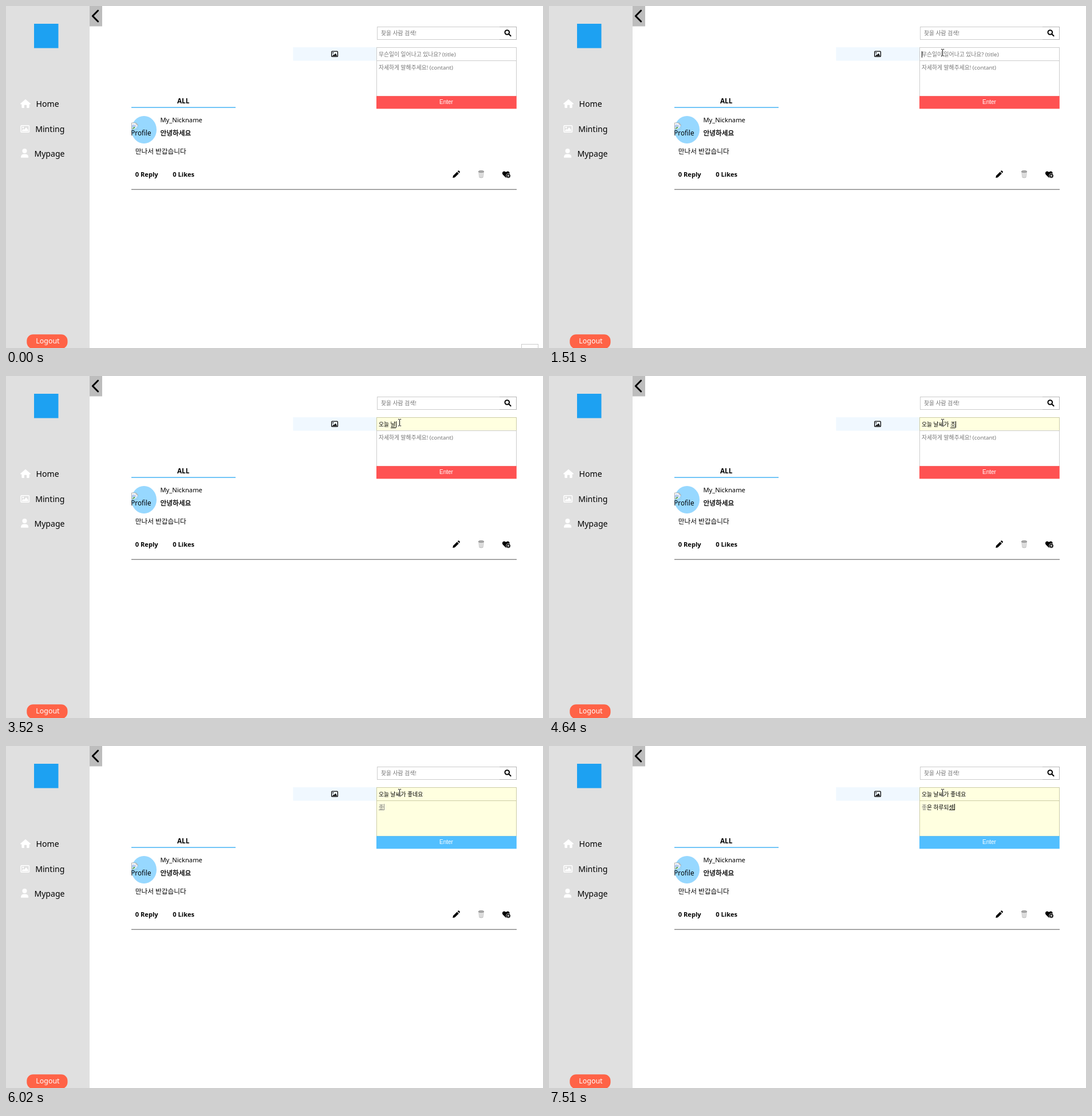
Write an HTML page that moves like this. It is 938x597 px and loops after 8 s.

```html
<!DOCTYPE html>
<html lang="ko">
<head>
<meta charset="utf-8">
<title>Post form</title>
<style>
  html, body { margin: 0; width: 100%; height: 100%; overflow: hidden; background: #fff; }
  svg { display: block; width: 938px; height: 597px; }
  text { font: 11.7px "Noto Sans", "Noto Sans CJK KR", "Noto Sans CJK JP", sans-serif; white-space: pre; }
  .nav { font-size: 14.1px; }
  .logout { font-size: 12.4px; fill: #fff; }
  .latin { font-size: 11.2px; }
  .bold { font-size: 11.1px; font-weight: 600; }
  .medium { stroke: #000; stroke-width: .35px; }
  .all { font-size: 11.8px; font-weight: 700; }
  .enter { font: 10px "Liberation Sans", sans-serif; fill: #fff; }
  .field { font-size: 9.8px; }
  .hint { fill: #757575; }
  .box { fill: #fff; stroke: #ccc; }
  .typed { fill: #ffffe0; stroke: #cccca6; }
  .crisp { shape-rendering: crispEdges; }
</style>
</head>
<body>
<svg viewBox="0 0 938 597">
  <!-- sidebar -->
  <rect width="146" height="597" fill="#e0e0e0"/>
  <rect x="146" width="22" height="35.5" fill="#bdbdbd"/>
  <path d="M160.7 8L151.3 17.5L160.7 27" fill="none" stroke="#000" stroke-width="3" stroke-linecap="round" stroke-linejoin="round"/>
  <rect x="49" y="31" width="42.5" height="42.5" fill="#1da1f2"/>
  <g fill="#fff">
    <path d="M34 162.8L43 170.6Q43 171.6 42 171.6H40.6V177Q40.6 178 39.6 178H36.2V173.6Q36.2 172.7 35.3 172.7H32.7Q31.8 172.7 31.8 173.6V178H28.4Q27.4 178 27.4 177V171.6H26Q25 171.6 25 170.6Z"/>
    <path fill-rule="evenodd" d="M27 208H39.5Q41.2 208 41.2 209.7V219.3Q41.2 221 39.5 221H27Q25.3 221 25.3 219.3V209.7Q25.3 208 27 208ZM26.9 209.6V219.4H39.6V209.6Z"/>
    <circle cx="29.8" cy="212" r="1.5"/>
    <path d="M27.8 218.6V217L30.3 214.6L31.8 216L35.2 211.8L38.8 216.4V218.6Z"/>
    <circle cx="32.5" cy="253" r="4"/>
    <path d="M26 264.8Q26 258.5 31 258.5H34Q39.2 258.5 39.2 264.8Z"/>
  </g>
  <text class="nav" x="52.6" y="176.1">Home</text>
  <text class="nav" x="51.2" y="219.8">Minting</text>
  <text class="nav" x="49.4" y="262.7">Mypage</text>
  <rect x="36.3" y="573.3" width="71.2" height="25" rx="11" fill="#ff6347"/>
  <text class="logout" x="52.3" y="589.2">Logout</text>

  <!-- search -->
  <rect class="box crisp" x="648.5" y="36.5" width="243" height="22"/>
  <path class="crisp" d="M862 36.5H891.5V58.5H862" fill="none" stroke="#b5b5b5"/>
  <text class="field hint" x="655" y="50.7">찾을 사람 검색!</text>
  <g fill="none" stroke="#000" stroke-width="2">
    <circle cx="875.3" cy="46" r="3.8"/>
    <path d="M878.1 48.8L881.6 52.3" stroke-linecap="round"/>
  </g>

  <!-- post form -->
  <rect x="501.5" y="72" width="146" height="23.5" fill="#f0f8ff"/>
  <rect x="568.7" y="79.2" width="10.7" height="9.2" rx="1.2" fill="none" stroke="#000" stroke-width="1.3"/>
  <circle cx="571.4" cy="81.8" r="1"/>
  <path d="M570 87.2L572.3 84.4L573.4 85.5L575.6 82.4L578.4 87.2Z"/>
  <rect id="titleBox" class="box crisp" x="647.5" y="72.5" width="244" height="23"/>
  <rect id="bodyBox" class="box crisp" x="647.5" y="95.5" width="244" height="62"/>
  <rect id="button" x="647" y="157.2" width="244.8" height="22.2"/>
  <text class="enter" x="769" y="171.3" text-anchor="middle">Enter</text>
  <text id="titleHint" class="field hint" x="651" y="87.6">무슨일이 일어나고 있나요? (title)</text>
  <text id="bodyHint" class="field hint" x="651" y="110.6">자세하게 말해주세요! (contant)</text>
  <text id="titleText" class="field" x="651" y="87.6"></text>
  <text id="bodyText" class="field" x="651" y="110.6"></text>
  <rect id="underline" class="crisp" height="1"/>
  <rect id="caret" class="crisp" width="1" height="11"/>

  <!-- feed -->
  <text class="all" x="309.7" y="170" text-anchor="middle">ALL</text>
  <rect x="219" y="176.3" width="182" height="1.6" fill="#52b8f6"/>
  <ellipse cx="241" cy="216" rx="22" ry="24" fill="#97d8ff"/>
  <path d="M219.5 204H227L230 207V215H219.5Z" fill="#fff" stroke="#999" stroke-width=".8"/>
  <path d="M220 208Q223 205 226 208L229 210L220 213Z" fill="#b5cdf2"/>
  <path d="M220 215L224 210.5L226 212.5L220.8 215Z" fill="#53a653"/>
  <path d="M224 215.5L230.5 209V215.5Z" fill="#97d8ff"/>
  <path d="M227 204V207H230" fill="none" stroke="#999" stroke-width=".8"/>
  <text x="218.3" y="226.2">Profile</text>
  <text class="latin" x="269.4" y="202.5">My_Nickname</text>
  <text class="medium" x="269.5" y="226.3">안녕하세요</text>
  <text x="225.7" y="257.9">만나서 반갑습니다</text>
  <text class="bold" x="225.8" y="298">0 Reply</text>
  <text class="bold" x="291.3" y="298">0 Likes</text>
  <path d="M780.3 300L781 296.3L787.9 289.4L790.9 292.4L784 299.3ZM788.7 288.6L789.8 287.6Q790.6 287 791.4 287.6L792.7 288.9Q793.3 289.7 792.7 290.5L791.7 291.6Z"/>
  <g fill="#f0f0f0" stroke="#999" stroke-width=".6">
    <path d="M825.8 289.5L827 299.2Q830 300.6 833 299.2L834.3 289.5Z"/>
    <path d="M828.2 291L828.7 299M830 291V299.3M831.8 291L831.3 299" stroke="#bbb" fill="none"/>
    <ellipse cx="830" cy="289" rx="4.8" ry="1.7" fill="#aaa" stroke="#777"/>
  </g>
  <path d="M873.3 299.8L867.9 294.4Q865.9 291.8 867.8 289.5Q870.6 287.2 873.3 290Q876 287.2 878.8 289.5Q880.7 291.8 878.7 294.4Z"/>
  <circle cx="877.4" cy="296.4" r="3.9" stroke="#fff" stroke-width=".7"/>
  <path d="M875.3 296.4H879.5M877.4 294.3V298.5" stroke="#fff"/>
  <rect x="219" y="319.7" width="673" height="1" fill="#555"/>

  <rect id="popup" class="box crisp" x="900.5" y="590.5" width="29" height="20"/>
  <g id="pointer" fill="none">
    <path d="M685 75.5H686.7L687.6 76.3L688.5 75.5H690.2M687.6 76.3V86.2M685 87H686.7L687.6 86.2L688.5 87H690.2" stroke="#fff" stroke-width="2.2" opacity=".6"/>
    <path d="M685 75.5H686.7L687.6 76.3L688.5 75.5H690.2M687.6 76.3V86.2M685 87H686.7L687.6 86.2L688.5 87H690.2" stroke="#000"/>
  </g>
</svg>
<script>
  const LOOP = 8000;
  const $ = id => document.getElementById(id);

  // [time, committed text, syllable being composed]
  const titleKeys = [
    [0, '', ''],
    [1760, '', 'ㅇ'], [1890, '', '오'],
    [2380, '', '온'], [2510, '오', '느'], [2640, '오', '늘'], [2770, '오늘 ', ''],
    [3140, '오늘 ', 'ㄴ'], [3270, '오늘 ', '나'], [3520, '오늘 ', '날'],
    [3770, '오늘 날', 'ㅆ'], [3890, '오늘 날', '씨'], [4020, '오늘 날씨', 'ㄱ'],
    [4140, '오늘 날씨', '가'], [4260, '오늘 날씨가 ', 'ㅈ'],
    [4640, '오늘 날씨가 ', '조'], [4760, '오늘 날씨가 ', '좋'], [4890, '오늘 날씨가 좋', 'ㄴ'],
    [5020, '오늘 날씨가 좋', '네'], [5140, '오늘 날씨가 좋네', '요'],
    [5400, '오늘 날씨가 좋네요', '']
  ];
  const bodyKeys = [
    [0, '', ''],
    [5900, '', 'ㅈ'], [6020, '', '좋'], [6270, '좋', 'ㅇ'], [6390, '좋', '으'],
    [6520, '좋', '은'], [6640, '좋은 ', ''],
    [6770, '좋은 ', '하'], [6890, '좋은 ', '할'], [7020, '좋은 하', '루'],
    [7140, '좋은 하루', '도'], [7260, '좋은 하루', '되'], [7390, '좋은 하루되', '세'],
    [7510, '좋은 하루되', '셍']
  ];

  const keyAt = (keys, t) => keys.findLast(k => k[0] <= t);
  const within = (t, a, b) => t >= a && t < b;
  const show = (el, on) => el.setAttribute('visibility', on ? 'visible' : 'hidden');
  const place = (el, attrs) => { for (const k in attrs) el.setAttribute(k, attrs[k]); };

  function fillField(name, text) {
    const el = $(name + 'Text');
    if (el.textContent !== text) el.textContent = text;
    show($(name + 'Hint'), !text);
    $(name + 'Box').setAttribute('class', (text ? 'typed' : 'box') + ' crisp');
    return el;
  }

  function draw(t) {
    const inBody = t >= 5400;
    const title = keyAt(titleKeys, t), body = keyAt(bodyKeys, t);
    // Ink is still fading in just after the first key in each field.
    const ink = within(t, 1760, 2010) || within(t, 5900, 6150) ? '#888' : '#000';

    const titleEl = fillField('title', title[1] + title[2]);
    titleEl.setAttribute('fill', inBody ? '#000' : ink);

    const text = body[1] + body[2];
    const bodyEl = fillField('body', text);
    if (text && !bodyEl.querySelector('tspan')) {
      bodyEl.innerHTML = `<tspan fill="#777">${text[0]}</tspan>${text.slice(1)}`;
    }
    $('button').setAttribute('fill', text ? '#52bfff' : '#ff5252');

    const el = inBody ? bodyEl : titleEl;
    const [, done, live] = inBody ? body : title;
    const end = done || live ? el.getComputedTextLength() : 0;
    const start = done && live ? el.getSubStringLength(0, done.length) : 0;
    const top = inBody ? (text ? 101 : 99) : 79;
    place($('caret'), { x: Math.round(651 + end), y: top, fill: ink });
    show($('caret'), within(t, 260, 890) || t >= 1510);
    place($('underline'), {
      x: Math.round(651 + start), width: Math.round(end - start),
      y: inBody ? 111 : 90, fill: ink
    });
    show($('underline'), !!live);

    show($('popup'), t < 130);
    show($('pointer'), within(t, 390, 630) || t >= 1140);
  }

  let origin;
  function tick(now) {
    origin ??= now;
    draw((now - origin) % LOOP);
    requestAnimationFrame(tick);
  }
  draw(0);
  requestAnimationFrame(tick);
</script>
</body>
</html>
```
